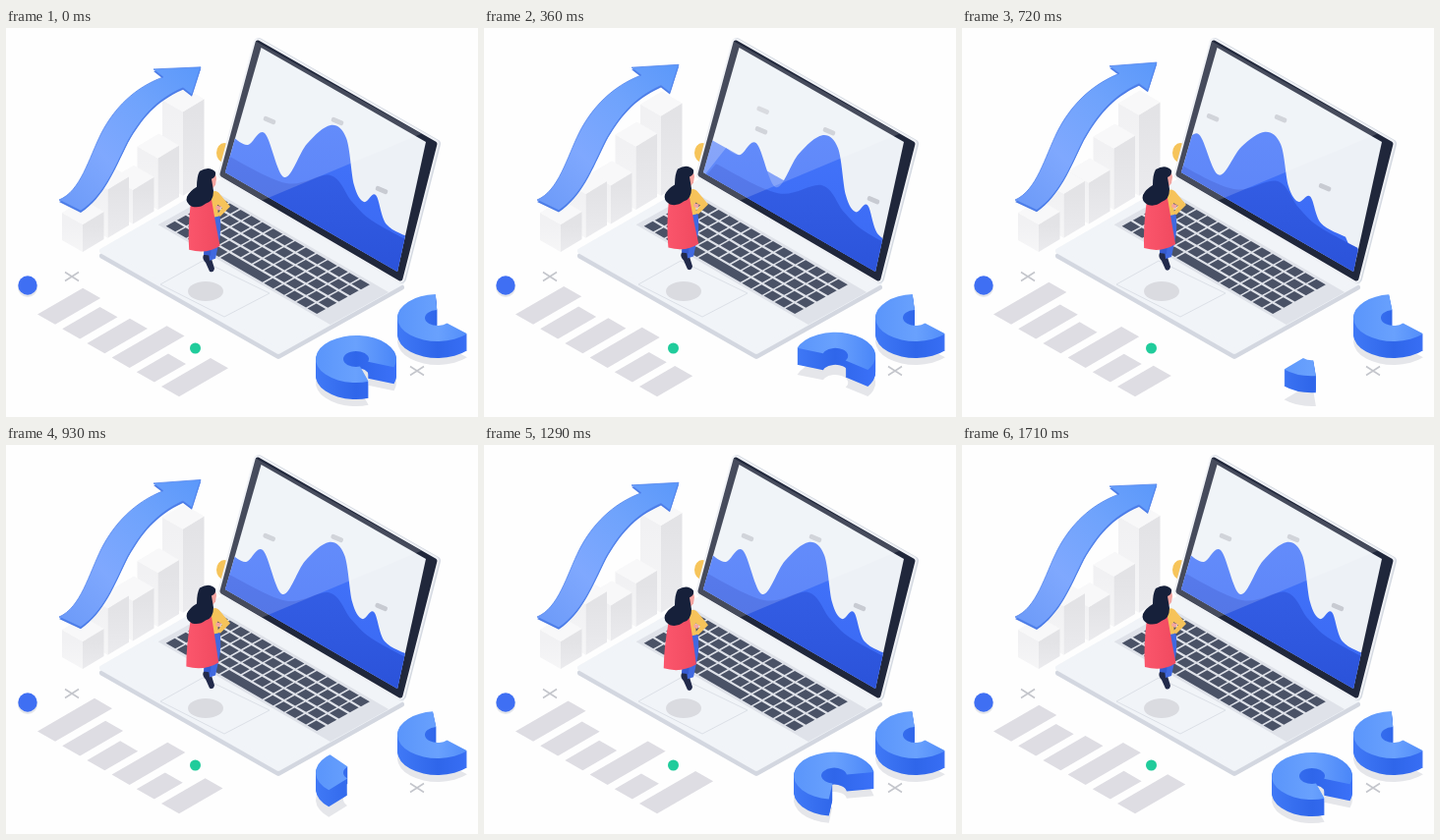
Recreate the animation shown at these times as an HTML page with a canvas. Size 480 by 396 pixels, loop 1740 ms.

```html
<!DOCTYPE html>
<html lang="en">
<head>
<meta charset="utf-8">
<title>Isometric analytics</title>
<style>
html, body { margin: 0; width: 100%; height: 100%; overflow: hidden; background: #fefefe; }
canvas { display: block; }
</style>
</head>
<body>
<canvas id="stage" width="480" height="396"></canvas>
<script>
const ctx = document.getElementById('stage').getContext('2d');
const LOOP = 1740;

const clamp = v => Math.min(1, Math.max(0, v));
// One sway per loop, highest at the peak time.
const sway = (t, peak, size) => size * Math.cos((t - peak) / LOOP * 2 * Math.PI);

function poly(fill, ...p) {
  ctx.beginPath();
  for (let i = 0; i < p.length; i += 2) ctx.lineTo(p[i], p[i + 1]);
  ctx.closePath();
  ctx.fillStyle = fill;
  ctx.fill();
}
function rounded(fill, width, ...p) {
  poly(fill, ...p);
  ctx.lineJoin = 'round';
  ctx.lineWidth = width;
  ctx.strokeStyle = fill;
  ctx.stroke();
}
function oval(fill, x, y, rx, ry = rx) {
  ctx.beginPath();
  ctx.ellipse(x, y, rx, ry, 0, 0, 7);
  ctx.fillStyle = fill;
  ctx.fill();
}
function shape(fill, d) {
  ctx.fillStyle = fill;
  ctx.fill(new Path2D(d));
}
function line(color, width, d) {
  ctx.strokeStyle = color;
  ctx.lineWidth = width;
  ctx.stroke(new Path2D(d));
}
function blend(x0, y0, x1, y1, ...colors) {
  const g = ctx.createLinearGradient(x0, y0, x1, y1);
  colors.forEach((c, i) => g.addColorStop(i / (colors.length - 1), c));
  return g;
}
function moved(x, y, paint) {
  ctx.save();
  ctx.translate(x, y);
  paint();
  ctx.restore();
}

// Columns and arrow

function column(i, h) {
  const x = 78 + 25.5 * i, foot = 228 - 14.3 * i, y = foot - h;
  poly(blend(0, y, 0, foot, '#f1f1f3', '#f6f6f7'), x - 21, y - 12, x, y, x, foot, x - 21, foot - 12);
  poly(blend(0, y, 0, foot, '#e3e3e6', '#ebebee'), x, y, x + 21.5, y - 13, x + 21.5, foot - 13, x, foot);
  poly('#f8f8f9', x, y, x + 21.5, y - 13, x + 1, y - 25, x - 21, y - 12);
}
function columns(t) {
  column(4, 85 + sway(t, 1350, 4));
  column(3, 55 + sway(t, 500, 11));
  column(2, 38 + sway(t, 720, 4));
  column(1, 48 + sway(t, 1400, 4));
  column(0, 28);
}
function arrow(t) {
  const lift = sway(t, 1640, 2.5) - 2.5;
  const body = 'M54 175C76 166 84 133 97 107C110 82 130 61 160 50L150 42L198 40L189 68L180 61' +
    'C152 73 138 91 124 115C110 143 100 170 76 186Z';
  ctx.save();
  // The head sways while the tail stays put.
  ctx.transform(1, lift / 143, 0, 1, 0, -lift / 143 * 55);
  moved(0, 2, () => shape('#4a7ae6', body));
  shape(blend(55, 180, 198, 40, '#6c9af8', '#7fa8fe', '#6fa3fc', '#5b98fa'), body);
  line('#5486ee', 0.8, body);
  ctx.restore();
}

// Floor

function floorBar(i, length) {
  const x = 32 + 25.2 * i, y = 291.5 + 14.7 * i, end = x + length, top = y - length * 0.58;
  poly('#dedde3', x, y, end, top, end + 18, top + 10.3, x + 18, y + 10.3);
}
function floorBars(t) {
  floorBar(0, 52 + sway(t, 930, 6));
  floorBar(1, 41 + sway(t, 1000, 3));
  floorBar(2, 39 + sway(t, 200, 6));
  floorBar(3, 56 + sway(t, 1300, 3));
  floorBar(4, 31 + sway(t, 350, 4));
  floorBar(5, 46 + sway(t, 1400, 12));
}
function cross(x, y) {
  line('#c3c5cb', 1.5, `M${x - 7} ${y - 4.5}l14 9m0 -9l-14 9`);
}

// Laptop

function deckPoint(u, v) {
  return [161 + 155 * u + 56 * v, 202 + 90 * u - 31 * v];
}
function deckQuad(fill, u0, v0, u1, v1) {
  poly(fill, ...deckPoint(u0, v0), ...deckPoint(u1, v0), ...deckPoint(u1, v1), ...deckPoint(u0, v1));
}
function deck() {
  const slab = (fill, y) => rounded(fill, 6, 98, 227 + y, 277, 329 + y, 402, 259 + y, 221, 156 + y);
  slab('#d3d7e0', 5);
  slab('#f1f4f8', 0);
  deckQuad('#dfe2e9', -0.03, -0.03, 1.1, 1.03);
  const rows = 5, cols = 14;
  for (let r = 0; r < rows; r++) {
    for (let c = 0; c < cols; c++) {
      const space = r === 0 && c === 5 ? 4 : 1;
      deckQuad('#4a5266', (c + 0.06) / cols, (r + 0.09) / rows, (c + space - 0.08) / cols, (r + 0.89) / rows);
      c += space - 1;
    }
  }
  line('#dce0e7', 1, 'M157 261L200 237L268 270L222 294Z');
  oval('#dadbe0', 203, 268, 18, 10);
}

const CREST = [[232, 112], [246, 119], [263, 107], [283, 152], [306, 118], [330, 99],
  [346, 112], [354, 160], [364, 177], [376, 170], [387, 200], [412, 214]];
const FRONT = [[222, 128], [285, 158], [330, 150], [352, 177], [372, 196], [412, 218]];
const TAGS = [[268, 94], [337, 95], [382, 165]];

function area(fill, pts) {
  const at = i => pts[Math.max(0, Math.min(pts.length - 1, i))];
  ctx.beginPath();
  ctx.moveTo(...pts[0]);
  for (let i = 0; i < pts.length - 1; i++) {
    const [a, b, c, d] = [at(i - 1), at(i), at(i + 1), at(i + 2)];
    ctx.bezierCurveTo(b[0] + (c[0] - a[0]) / 6, b[1] + (c[1] - a[1]) / 6,
      c[0] - (d[0] - b[0]) / 6, c[1] - (d[1] - b[1]) / 6, ...c);
  }
  ctx.lineTo(430, 310);
  ctx.lineTo(170, 310);
  ctx.lineTo(170, 190);
  ctx.closePath();
  ctx.fillStyle = fill;
  ctx.fill();
}
function tag(x, y) {
  moved(x, y, () => {
    ctx.rotate(0.4);
    ctx.beginPath();
    ctx.roundRect(-6.5, -2.5, 13, 5, 2);
    ctx.fillStyle = '#c8cbd2';
    ctx.fill();
  });
}
function wave(crest, front, tags) {
  area(blend(0, 95, 0, 235, '#4374fa', '#3a69f4'), crest);
  area(blend(0, 130, 0, 245, '#355fe6', '#2b53da'), front);
  tags.forEach(p => tag(...p));
}
function chart(t) {
  // The next wave rises out of a slope while it drifts in from the left.
  if (t > 250) {
    const left = Math.max(0, 1 - (t - 480) / 470);
    const rise = clamp(1 - left ** 3), drift = left ** 1.5;
    ctx.globalAlpha = clamp((t - 250) / 150);
    wave(CREST.map(([px, py]) => {
      const x = px - 45 * left, slope = 112 + (x - 228) * 0.56;
      return [x, slope + (py - slope) * rise];
    }),
    FRONT.map(([x, y]) => [x - 20 * left, y + 12 * left]),
    TAGS.map(([x, y]) => [x - 38 * drift, y - 8 * drift]));
    ctx.globalAlpha = 1;
  }
  // The last one slides away down the screen edge.
  const slide = Math.max(0, (t - 250) / 230) ** 2;
  if (slide < 3) moved(60 * slide, 44 * slide, () => wave(CREST, FRONT, TAGS));
}
function lid(t) {
  const frame = [256, 15, 436, 118, 401, 255, 220, 149];
  moved(1, 0, () => rounded('#d5dae2', 10, ...frame));
  rounded('#f0f2f6', 9, ...frame);
  rounded('#20273b', 5, ...frame);
  ctx.save();
  ctx.clip();
  poly('#edf1f6', 259.5, 20, 427, 116, 398, 248, 223, 147);
  ctx.save();
  ctx.clip();
  chart(t);
  ctx.restore();
  ctx.restore();
  // Glare over glass and bezel.
  ctx.save();
  poly('rgba(0,0,0,0)', 253, 13, 439, 117, 403, 258, 217, 150);
  ctx.clip();
  poly('rgba(255,255,255,.17)', 190, 0, 460, 0, 460, 92, 190, 205);
  ctx.restore();
}

// Figure

function woman(t) {
  const hem = sway(t, 300, 2.5);
  moved(0, 1.4 + sway(t, 1350, 2), () => {
    shape('#222a4b', 'M201 229L207 227L212 243Q211 248 207 246L203 237Q199 233 201 229Z');
    shape('#4169df', 'M203 188L217 186Q220 204 216 219L213 233L207 235L205 217Z');
    shape('#365bd0', 'M203 200L210 205L208 230L201 229Z');
    shape('#f6c35a', 'M208 166Q214 162 218 168L228 180L218 190L214 189L220 181L215 178L216 190L206 192Z');
    shape('#f4a4a0', 'M214 179l5 1l-2 4l-4-2z');
    shape('#f4a4a0', 'M206 147Q214 145 214 152L213 158L208 164L203 161Z');
    shape(blend(184, 0, 218, 0, '#fb566c', '#f0495f'),
      `M188 175Q200 169 209 173Q213 197 ${217 + hem / 2} 220Q${203 + hem} 229 ${185 + hem} 224Q${184 + hem / 2} 203 188 175Z`);
    shape('#16203a', 'M197 144Q207 138 213 145Q214 150 209 152Q210 158 211 164Q211 175 203 177' +
      'Q197 182 189 180Q182 176 184 170Q187 164 194 160Q194 149 197 144Z');
  });
}

// Rings

function sector(fill, x, y, from, to) {
  const a = from * Math.PI / 180, b = to * Math.PI / 180;
  ctx.beginPath();
  ctx.ellipse(x, y, 41, 24, 0, a, b);
  ctx.ellipse(x, y, 13, 8, 0, b, a, true);
  ctx.closePath();
  ctx.fillStyle = fill;
  ctx.fill();
}
function ring(x, y, from, to, lift) {
  if (to - from < 1) return;
  sector('#e5e6ea', x, y + 24, from, to);
  const side = blend(x - 41, 0, x + 41, 0, '#4079f6', '#2f66ea', '#3b71f8');
  for (let h = 17; h > 0; h--) sector(side, x, y - lift + h, from, to);
  sector(blend(x - 41, y, x + 41, y, '#5a95fb', '#69a1fd', '#4a86f8'), x, y - lift, from, to);
}
function rings(t) {
  ring(439, 295, 43, 265 + sway(t, 0, 2), 0);
  const erase = t / 570, grow = clamp((t - 600) / 870);
  if (erase < 1) {
    ring(356 + 3 * erase ** 2, 337, 72 + 348 * erase ** 2.2, 380 + 40 * erase ** 2, 8 * erase ** 2);
  } else {
    ring(356, 337, 72 + 70 * Math.sin(Math.PI * grow) ** 2, 72 + 308 * (1 - (1 - grow) ** 1.5), 9 * (1 - grow) ** 2);
  }
}

function draw() {
  const t = performance.now() % LOOP;
  ctx.fillStyle = '#fefefe';
  ctx.fillRect(0, 0, 480, 396);
  columns(t);
  arrow(t);
  floorBars(t);
  cross(67, 253);
  cross(418, 349);
  oval('#e3e5ea', 22, 264, 10);
  oval('#3f6ff3', 22, 262, 9.7);
  oval('#20cc9b', 192.5, 326, 5.5);
  oval('#f6c45a', 222, 127, 8, 10);
  deck();
  lid(t);
  woman(t);
  rings(t);
  requestAnimationFrame(draw);
}
draw();
</script>
</body>
</html>
```
